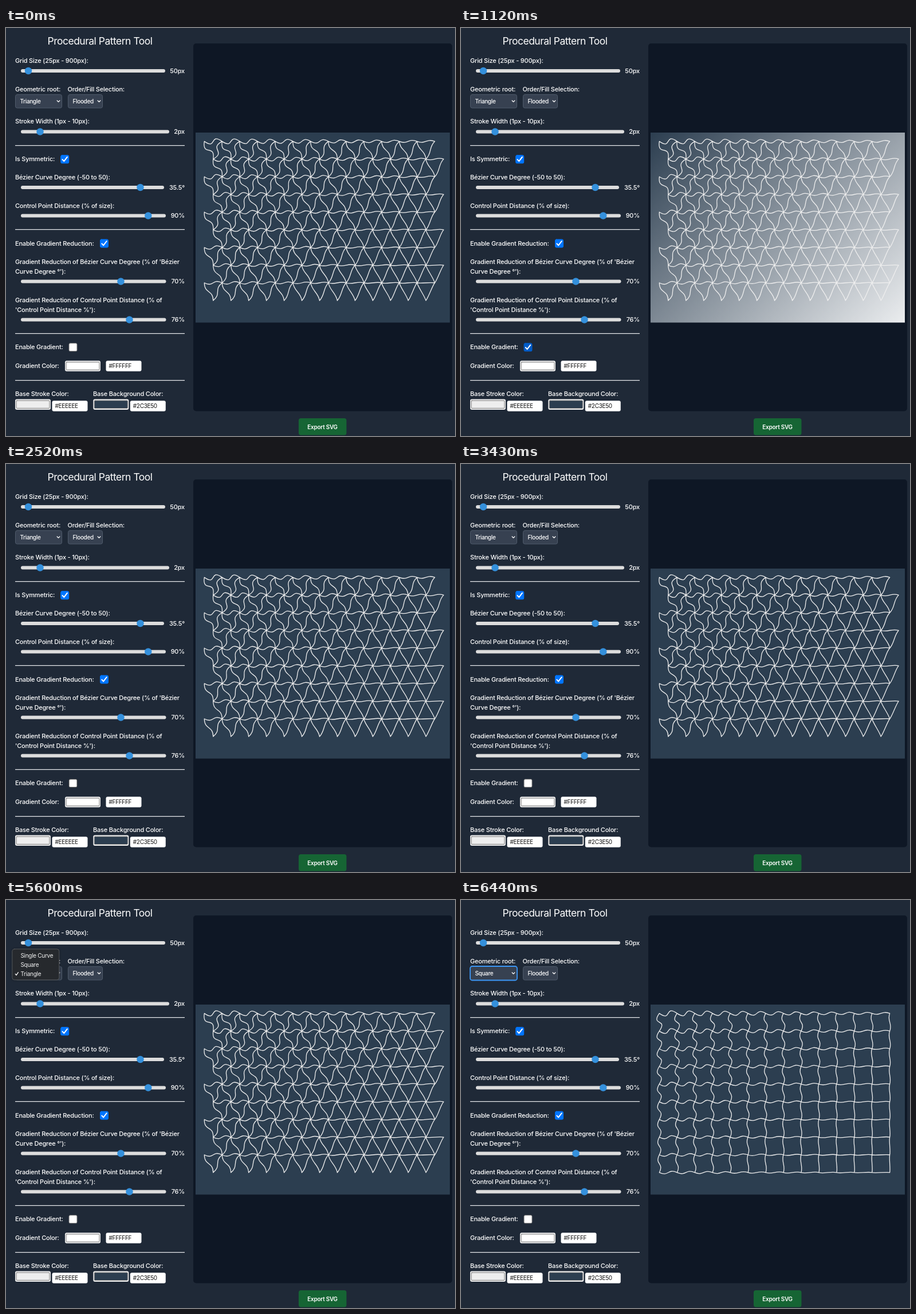
Write an HTML page with a canvas that moves like this. It is 784x714 px and loops after 8 s.

```html
<!DOCTYPE html>
<html lang="en">
<head>
<meta charset="utf-8">
<title>Procedural Pattern Tool</title>
<style>
  html, body { margin: 0; width: 100%; height: 100%; overflow: hidden; background: #1f2937; }
  canvas { display: block; width: 784px; height: 714px; }
</style>
</head>
<body>
<canvas id="stage"></canvas>
<script>
const WIDTH = 784, HEIGHT = 714, LOOP = 8000;
const canvas = document.getElementById('stage');
const ratio = window.devicePixelRatio || 1;
canvas.width = WIDTH * ratio;
canvas.height = HEIGHT * ratio;
const ctx = canvas.getContext('2d');
ctx.scale(ratio, ratio);
ctx.lineJoin = ctx.lineCap = 'round';

// Each kind of text: weight, size, letter spacing
const STYLES = {
  title: [400, 17.5, -0.5],
  label: [500, 11, -0.2],
  field: [400, 10, -0.3],
  select: [500, 10, -0.35],
  button: [600, 10, -0.25]
};

function text(string, x, centerY, style = 'label', color = '#fff', align = 'left') {
  const [weight, size, spacing] = STYLES[style];
  ctx.font = `${weight} ${size}px Inter, sans-serif`;
  ctx.letterSpacing = spacing + 'px';
  ctx.textAlign = align;
  ctx.fillStyle = color;
  ctx.fillText(string, x, centerY + size * 0.36);
}

function box(x, y, w, h, radius, fill, stroke, lineWidth = 1) {
  ctx.beginPath();
  ctx.roundRect(x, y, w, h, radius);
  if (fill) { ctx.fillStyle = fill; ctx.fill(); }
  if (stroke) { ctx.strokeStyle = stroke; ctx.lineWidth = lineWidth; ctx.stroke(); }
}

function polyline(points, color, width) {
  ctx.beginPath();
  for (const [x, y] of points) ctx.lineTo(x, y);
  ctx.strokeStyle = color;
  ctx.lineWidth = width;
  ctx.stroke();
}

function slider(y, end, knob, value) {
  box(26, y - 3, end - 26, 6, 3, '#dddddd');
  ctx.beginPath();
  ctx.arc(knob, y, 6.2, 0, 2 * Math.PI);
  ctx.fillStyle = '#3490dc';
  ctx.fill();
  text(value, 312, y, 'label', '#fff', 'right');
}

function checkbox(cx, cy, checked, color) {
  box(cx - 7, cy - 7, 14, 14, 2, checked ? color : '#fff', color);
  if (checked) polyline([[cx - 4.2, cy + 0.4], [cx - 1.4, cy + 3.4], [cx + 4.3, cy - 4]], '#fff', 2);
}

function select(x, w, value, focused) {
  box(x + 0.5, 116.5, w - 1, 23.5, 3, '#374151', '#4f5b6b');
  if (focused) box(x, 116, w, 24.5, 3.5, null, '#3b96f5', 1.8);
  text(value, x + 8.5, 128.2, 'select');
  const arrow = x + w - 6.5;
  polyline([[arrow - 2.3, 127], [arrow, 129.4], [arrow + 2.3, 127]], '#fff', 1.3);
}

function swatch(x, y, color) {
  box(x, y, 62, 18.5, 3, '#f3f3f3');
  box(x + 2, y + 2.5, 58, 13.5, 1, color, '#777');
}

function hexField(x, y, value) {
  box(x, y, 62, 18.5, 3, '#fff');
  text(value, x + 5, y + 9.4, 'field', '#111');
}

function drawControls(state) {
  text('Procedural Pattern Tool', 164, 23, 'title', '#fff', 'center');
  text('Grid Size (25px - 900px):', 16, 57.5);
  slider(75, 278, 39, '50px');

  text('Geometric root:', 16, 107);
  text('Order/Fill Selection:', 107.5, 107);
  select(16, 82, state.square ? 'Square' : 'Triangle', state.square);
  select(108, 61, 'Flooded', false);

  text('Stroke Width (1px - 10px):', 16, 163.5);
  slider(181.5, 285, 59.5, '2px');

  text('Is Symmetric:', 16, 229.5);
  checkbox(102.7, 229.7, true, '#0075ff');
  text('Bézier Curve Degree (-50 to 50):', 16, 261.5);
  slider(279, 276, 234.5, '35.5°');
  text('Control Point Distance (% of size):', 16, 311);
  slider(328.5, 279, 248.3, '90%');

  text('Enable Gradient Reduction:', 16, 377);
  checkbox(171.5, 377, true, '#0075ff');
  text("Gradient Reduction of Bézier Curve Degree (% of 'Bézier", 16, 409);
  text("Curve Degree °'):", 16, 426);
  slider(443.5, 279.5, 200.5, '70%');
  text('Gradient Reduction of Control Point Distance (% of', 16, 476);
  text("'Control Point Distance %'):", 16, 493);
  slider(510.5, 279.5, 215.5, '76%');

  text('Enable Gradient:', 16, 558.5);
  checkbox(117, 558.7, state.gradient, state.checkColor);
  text('Gradient Color:', 16, 591.5);
  swatch(103, 582.3, '#ffffff');
  hexField(174.5, 582.3, '#FFFFFF');

  text('Base Stroke Color:', 16, 640);
  swatch(16, 649.5, '#eeeeee');
  hexField(80.5, 652.2, '#EEEEEE');
  text('Base Background Color:', 152, 640);
  swatch(152.3, 649.5, '#2c3e50');
  hexField(216.8, 652.2, '#2C3E50');

  for (const y of [205.5, 352.5, 534.5, 616.5]) box(16, y - 0.6, 296, 1.3, 0, '#e5e7eb');
}

const AREA = { x: 331, y: 183, w: 444, h: 332.5 };
const CELL = 30.95, LEFT = 346.3, TOP = 198.4, COLS = 13, ROWS = 9;

// S-shaped edge whose bend weakens along the diagonal of the grid
function edge(x1, y1, x2, y2) {
  const along = (x1 + x2) / 2 - LEFT + (y1 + y2) / 2 - TOP;
  const progress = Math.min(1, along / ((COLS + ROWS) * CELL));
  const bend = 35.5 * Math.PI / 180 * (1 - 0.7 * progress);
  const reach = 0.9 * CELL * (1 - 0.76 * progress);
  const angle = Math.atan2(y2 - y1, x2 - x1) + bend;
  const dx = reach * Math.cos(angle), dy = reach * Math.sin(angle);
  ctx.moveTo(x1, y1);
  ctx.bezierCurveTo(x1 + dx, y1 + dy, x2 - dx, y2 - dy, x2, y2);
}

function drawPattern(state) {
  box(327, 27, 452, 643.5, 5, '#0e1725');
  ctx.fillStyle = '#2c3e50';
  if (state.gradient) {
    const reach = (AREA.w + AREA.h) / 2;
    const fade = ctx.createLinearGradient(AREA.x, AREA.y, AREA.x + reach, AREA.y + reach);
    fade.addColorStop(0, '#2c3e50');
    fade.addColorStop(1, '#ebedef');
    ctx.fillStyle = fade;
  }
  ctx.fillRect(AREA.x, AREA.y, AREA.w, AREA.h);

  ctx.beginPath();
  for (let row = 0; row <= ROWS; row++) {
    const y = TOP + row * CELL, below = y + CELL;
    for (let col = 0; col <= COLS; col++) {
      if (state.square) {
        const x = LEFT + col * CELL;
        if (col < COLS) edge(x, y, x + CELL, y);
        if (row < ROWS) edge(x, y, x, below);
      } else if (row < ROWS && col < COLS) {
        const x = LEFT + (col + row % 2 / 2) * CELL;
        edge(x, y, x + CELL, y);
        edge(x, y, x + CELL / 2, below);
        edge(x + CELL, y, x + CELL / 2, below);
      }
    }
  }
  ctx.strokeStyle = '#eeeeee';
  ctx.lineWidth = 1.3;
  ctx.stroke();

  box(511, 683, 83.5, 29.5, 4, '#166534');
  text('Export SVG', 552.5, 698, 'button', '#fff', 'center');
}

function drawMenu(opacity, highlighted) {
  ctx.save();
  ctx.globalAlpha = opacity;
  ctx.shadowColor = 'rgba(0,0,0,.4)';
  ctx.shadowBlur = 5 * ratio;
  box(10.8, 85.8, 82, 54, 4, '#26292d');
  ctx.shadowColor = 'transparent';
  box(10.8, 85.8, 82, 54, 4, null, '#56595d');
  ['Single Curve', 'Square', 'Triangle'].forEach((name, i) => {
    const y = 97 + 16 * i;
    if (name === highlighted) box(13.3, y - 8, 77, 16, 3, '#1a67c9');
    text(name, 25.5, y, 'field', '#f2f2f2');
  });
  polyline([[16.3, 129.3], [18, 131.6], [21.3, 126.6]], '#fff', 1.2);
  ctx.restore();
}

function checkColorAt(t) {
  if (t < 840) return '#767676';
  if (t < 980) return '#4f4f4f';
  if (t < 1120) return '#8d8d8d';
  if (t < 2450) return '#005cc8';
  if (t < 2520) return '#3793ef';
  return t < 3010 ? '#4f4f4f' : '#767676';
}

function menuHighlightAt(t) {
  if (t < 5040) return 'Triangle';
  return t >= 5600 && t < 5670 ? '' : 'Square';
}

function draw(t) {
  const state = {
    gradient: t >= 1120 && t < 2520,
    square: t >= 5880,
    checkColor: checkColorAt(t)
  };
  ctx.fillStyle = '#1f2937';
  ctx.fillRect(0, 0, WIDTH, HEIGHT);
  drawControls(state);
  drawPattern(state);
  if (t >= 4340 && t < 6090) {
    const fadeSteps = Math.max(0, Math.floor((t - 5740) / 70));
    drawMenu(1 - fadeSteps / 5, menuHighlightAt(t));
  }
}

let start;
function tick(now) {
  start ??= now;
  draw((now - start) % LOOP);
  requestAnimationFrame(tick);
}
requestAnimationFrame(tick);
</script>
</body>
</html>
```
